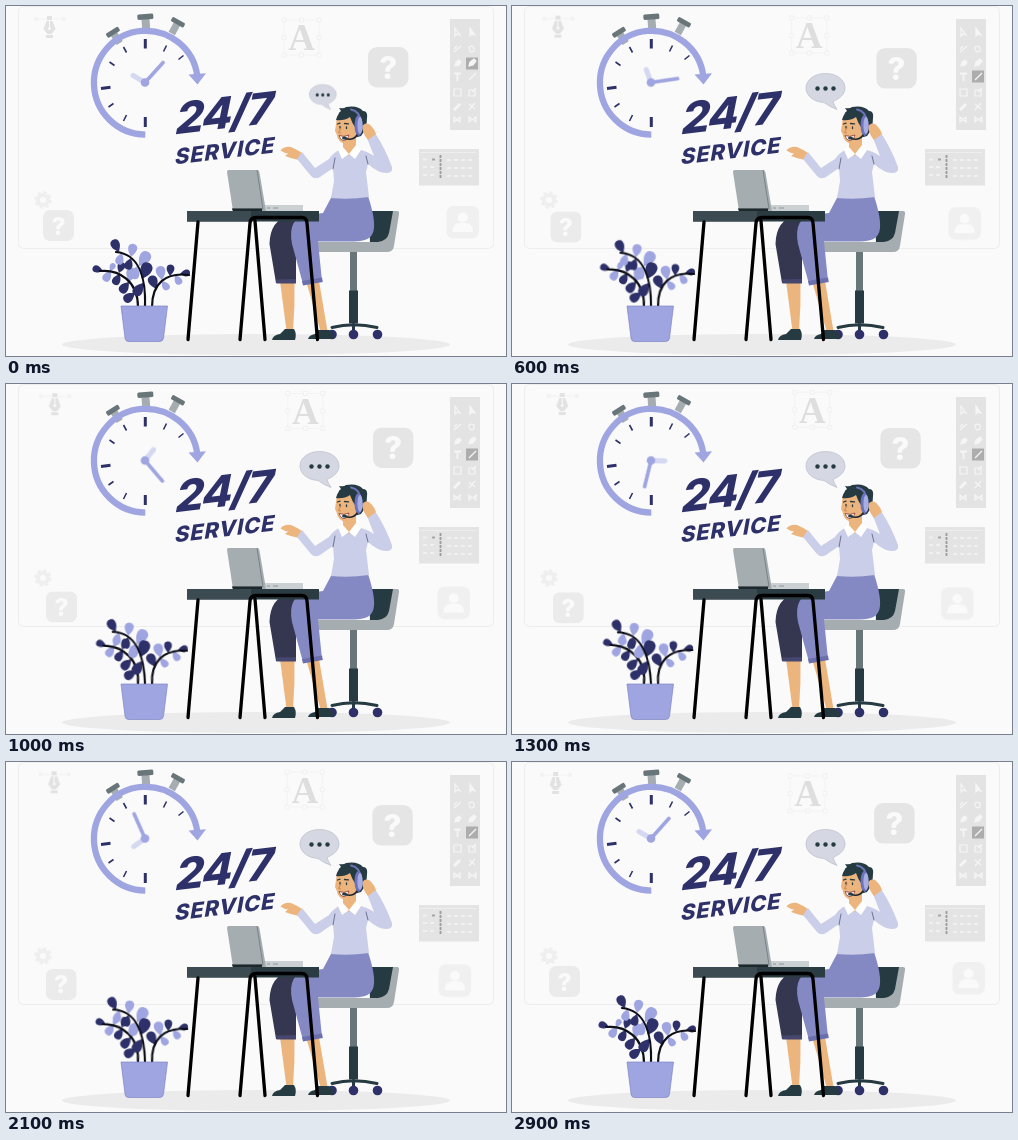
Animation, 500 px wide and 350 px high, one loop 3000 ms. Source, as an HTML page:

```html
<!DOCTYPE html>
<html lang="en">
<head>
<meta charset="utf-8">
<title>24/7 service</title>
<style>
html, body { margin: 0; height: 100%; overflow: hidden; background: #fafafa; }
svg { display: block; width: 100vw; height: 100vh; }
text { font-family: Inter, "Open Sans", sans-serif; font-weight: 800; }
.float, .sway, .hands, .bubble, .pick { animation: 3s infinite; }
.float, .sway { animation-timing-function: cubic-bezier(.37, 0, .63, 1); }
.float { animation-name: float; }
.sway { animation-name: sway; }
.hands { animation-name: turn; animation-timing-function: cubic-bezier(.37, 0, .63, 1); animation-delay: -50ms; transform-origin: 139px 76.5px; }
.bubble { animation-name: grow; animation-timing-function: ease-in-out; transform-origin: 324px 103px; }
.pick { animation-name: pick; animation-timing-function: linear; }
@keyframes float { 50% { transform: translate(var(--x), var(--y)); } }
@keyframes sway { 50% { transform: rotate(var(--a)); } }
@keyframes turn { to { transform: rotate(360deg); } }
@keyframes grow { 0% { transform: scale(.69); } 20%, 100% { transform: none; } }
@keyframes pick { 0% { transform: none; } 20%, 100% { transform: translateY(13px); } }
.ink { fill: #2e3169; }
.lilac { fill: #9fa5e0; }
.pale { fill: #cbcee8; }
.slate { fill: #263a42; }
.grey { fill: #a6adb0; }
.steel { fill: #68767a; }
.skin { fill: #ecb57d; }
.stem { fill: none; stroke: #0b0c16; stroke-width: 2.2; stroke-linecap: round; }
.line { fill: none; stroke-linecap: round; stroke-linejoin: round; }
</style>
</head>
<body>
<svg viewBox="0 0 500 350" preserveAspectRatio="none">
<defs>
  <path id="leaf" d="M0 0C-2-3-5.500-6-4.500-10.500C-3.500-14.500 3-14.500 4.200-10.500C5.200-6 2-3 0 0Z"/>
  <g id="knob"><path class="grey" d="M-4 0h8v12h-8z"/><rect class="steel" x="-8" y="-5" width="16" height="5.500" rx="1.500"/></g>
</defs>

<rect width="500" height="350" fill="#fafafa"/>
<rect x="12.500" y=".5" width="475" height="242" rx="5" fill="none" stroke="#ededed"/>

<!-- backdrop icons -->
<g class="float" style="--x:7px;--y:-1px">
  <path d="M30 13H57" stroke="#f3f3f3"/>
  <path d="M28 11h4v4h-4zM56 11h4v4h-4z" fill="#f3f3f3"/>
  <path d="M41 10h5v4h-5zM40.500 15h6l3 8-4 5h-4l-4-5zM40 29h7v3h-7z" fill="#e2e2e2"/>
  <path d="M43.500 15v7" stroke="#fafafa"/><circle cx="43.500" cy="22.500" r="1.500" fill="#fafafa"/>
</g>
<g class="float" style="--x:5px;--y:-6px">
  <path d="M278 14H313V49H278Z" fill="none" stroke="#f3f3f3"/>
  <path d="M276 12h4v4h-4zM293.500 12h4v4h-4zM311 12h4v4h-4zM276 29.500h4v4h-4zM311 29.500h4v4h-4zM276 47h4v4h-4zM293.500 47h4v4h-4zM311 47h4v4h-4z" fill="#fafafa" stroke="#efefef" stroke-width=".8"/>
  <text x="295.500" y="44.500" text-anchor="middle" fill="#dedede" style="font:700 37px 'Liberation Serif',serif">A</text>
</g>
<g class="float" style="--x:6.500px;--y:3.200px">
  <rect x="362" y="41" width="40.500" height="40.500" rx="9" fill="#e5e5e5"/>
  <text x="382.300" y="72.500" text-anchor="middle" font-size="31" fill="#fafafa">?</text>
</g>
<g class="float" style="--x:4px;--y:4.500px">
  <rect x="37" y="204" width="31" height="31" rx="7" fill="#ebebeb"/>
  <text x="52.500" y="228.500" text-anchor="middle" font-size="24.500" fill="#fafafa">?</text>
</g>
<g fill="none" stroke="#efefef">
  <circle cx="37" cy="194" r="5" stroke-width="4"/>
  <circle cx="37" cy="194" r="7.500" stroke-width="2.500" stroke-dasharray="3.300 2.590"/>
</g>
<g class="float" style="--x:-12px;--y:3.500px">
  <rect x="440.500" y="200" width="32.500" height="32.500" rx="7" fill="#f0f0f0"/>
  <circle cx="456.700" cy="211.500" r="5" fill="#fafafa"/>
  <path d="M446.500 226c0-6 3-9 7-9h6.500c4 0 7 3 7 9z" fill="#fafafa"/>
</g>

<!-- tool panel -->
<rect x="444" y="13" width="30" height="111" fill="#e3e3e3"/>
<rect class="pick" x="460" y="51.500" width="12" height="12" fill="#adadad"/>
<g fill="none" stroke="#f5f5f5" stroke-width="1.200">
  <path d="M449 22v8l2-2 3 1zM448 46l7-6M448 43l3-3M463 41q6-3 5 4q-5 3-5-4"/>
  <path d="M464 22v8l2-2 3 1zM449 60l1-4 3-2 2 2-2 3z" fill="#f5f5f5"/>
  <path d="M463 60l1-4 4-3 2 2-3 4z" fill="#f5f5f5"/>
  <path d="M448 67.500h7M451.500 67v8" stroke-width="1.800"/>
  <path d="M463 74l7-7"/>
  <path d="M448 83h7v7h-7zM463 84h6v6h-6zM466 86l4-4"/>
  <path d="M448 104l6-6" stroke-width="3"/>
  <path d="M463 104l6-7M463 98l6 5"/>
  <path d="M448 116v-5l6 5v-5zM463 111v5l3-2.500zM470 111v5l-3-2.500z"/>
</g>

<!-- small side panel -->
<rect x="413" y="143" width="60" height="36.500" fill="#e4e4e4"/>
<path d="M414 146.500H470" stroke="#eee"/>
<path d="M434.500 149v24" stroke="#9b9b9b" stroke-width="1.800" stroke-dasharray="3 1"/>
<path d="M426 153.500h3" stroke="#a5a5a5" stroke-width="2"/>
<path d="M417 153.500h6M417 161h13M417 169h13M441 154h28M441 162h28M441 170h28" stroke="#f0f0f0" stroke-width="2" stroke-dasharray="4 3"/>

<ellipse cx="250" cy="338.500" rx="194" ry="10.500" fill="#ebebeb"/>

<!-- clock -->
<use href="#knob" transform="translate(139.500 13)rotate(-4)"/>
<use href="#knob" transform="translate(108 28)rotate(-32)scale(.9)"/>
<use href="#knob" transform="translate(171 18)rotate(29)scale(.9)"/>
<path d="M139.300 128.600A51.900 51.900 0 1 1 191.300 70" fill="none" stroke="#9fa5e0" stroke-width="6.300"/>
<path class="lilac" d="M182.500 68.500L200 67.300L191.500 78.500Z"/>
<g class="line" stroke="#2e3169" style="stroke-linecap:butt">
  <path d="M139.300 33V42.500M139.300 111V121M95 82.500L104.500 81.300" stroke-width="3"/>
  <path d="M117.500 41l3 5.500M103.500 56l5 3.500M160.500 39.500l-3 6M177.500 49.500l-5 4M102.500 101l5-3.500M117.500 115l3-6" stroke-width="1.600"/>
</g>
<g class="hands line">
  <path d="M139 76.500L127 69.500" stroke="#d5d8f1" stroke-width="5"/>
  <path d="M139 76.500L157 56.500" stroke="#9fa5e0" stroke-width="3.600"/>
  <circle class="lilac" cx="139" cy="76.500" r="4.300"/>
</g>

<!-- lettering -->
<g class="ink">
  <text font-size="44.500" letter-spacing="-1.500" transform="matrix(1 -.12 -.2 1 167.500 128.500)">24/7</text>
  <text font-size="22" letter-spacing=".75" transform="matrix(1 -.12 -.18 1 168 158.500)">SERVICE</text>
</g>

<!-- speech bubble -->
<g class="bubble">
  <path d="M313.500 67.500C325 67.500 333 74 333 82C333 88 328 92.500 321 95.500Q322 99 325 103.500Q318 101 312 96.500C302 96 294 90 294 82C294 74 302 67.500 313.500 67.500Z" fill="#d5d7e2" stroke="#b9bccb" stroke-width=".7"/>
  <g class="slate"><circle cx="305.500" cy="82.500" r="2.200"/><circle cx="313.500" cy="82.500" r="2.200"/><circle cx="321.500" cy="82.500" r="2.200"/></g>
</g>

<!-- plant -->
<g class="sway" style="--a:7deg;transform-origin:131px 300px">
  <g class="lilac">
    <use href="#leaf" transform="translate(105 265)rotate(-145)scale(.9)"/>
    <use href="#leaf" transform="translate(104 265)rotate(30)scale(.65)"/>
    <use href="#leaf" transform="translate(123 276)rotate(15)scale(1.100)"/>
  </g>
  <g class="ink">
    <use href="#leaf" transform="translate(97 265)rotate(-72)scale(.8)"/>
    <use href="#leaf" transform="translate(113 267)rotate(20)scale(.85)"/>
    <use href="#leaf" transform="translate(114 268)rotate(-150)scale(.9)"/>
    <use href="#leaf" transform="translate(123 276)rotate(-140)"/>
    <use href="#leaf" transform="translate(129 287)rotate(-125)"/>
  </g>
  <path class="stem" d="M132 301C132 276 114 263 94 265"/>
</g>
<g class="sway" style="--a:-5deg;transform-origin:146px 300px">
  <g class="ink">
    <use href="#leaf" transform="translate(174 268)rotate(82)scale(.75)"/>
    <use href="#leaf" transform="translate(164 270)rotate(5)scale(.85)"/>
    <use href="#leaf" transform="translate(150 283)rotate(-20)scale(1.050)"/>
  </g>
  <g class="lilac">
    <use href="#leaf" transform="translate(169 269)rotate(150)scale(.8)"/>
    <use href="#leaf" transform="translate(156 274)rotate(-8)scale(1.050)"/>
    <use href="#leaf" transform="translate(156 275)rotate(145)scale(.8)"/>
  </g>
  <path class="stem" d="M146 301C146 277 160 266 183 269"/>
</g>
<g class="sway" style="--a:-4.600deg;transform-origin:139px 300px">
  <g class="lilac">
    <use href="#leaf" transform="translate(116 247)rotate(-160)scale(.9)"/>
    <use href="#leaf" transform="translate(125 251)rotate(12)"/>
    <use href="#leaf" transform="translate(133 260)rotate(36)scale(1.250)"/>
    <use href="#leaf" transform="translate(131 260)rotate(-165)"/>
  </g>
  <g class="ink">
    <use href="#leaf" transform="translate(113 246)rotate(-25)"/>
    <use href="#leaf" transform="translate(125 252)rotate(-160)scale(.9)"/>
    <use href="#leaf" transform="translate(136 273)rotate(24)scale(1.300)"/>
    <use href="#leaf" transform="translate(137 277)rotate(-145)scale(1.100)"/>
  </g>
  <path class="stem" d="M139 301C140 272 133 248 110 246"/>
</g>
<path d="M115 300H161.500L157.500 332Q157 335.500 153.500 335.500H122.500Q119.500 335.500 119 332Z" fill="#9fa5e0" stroke="#7f85c4" stroke-width=".7"/>

<!-- chair -->
<path class="slate" d="M363 206Q363 205 366 205H390L385 238H364Z"/>
<path class="grey" d="M387 205H391Q393.500 205 393 208L388 240Q387 246 381 246H314Q309 246 309 241V236H372Q381 235 383 227Z"/>
<path class="steel" d="M344 246h7v40h-7z"/>
<path class="slate" d="M343 284.500h9v33h-9z"/>
<path class="line" d="M326 321.500Q347.500 316 371 321.500M347.500 318v8" stroke="#263a42" stroke-width="3"/>
<g class="ink"><circle cx="326" cy="328.500" r="4.800"/><circle cx="347.500" cy="328.500" r="4.800"/><circle cx="371.500" cy="328.500" r="4.800"/></g>

<!-- legs -->
<path class="skin" d="M274 275H288.500Q289 300 287 325H280.500Z"/>
<path class="slate" d="M279 323H288Q291 328 289 334H266Q267 329 274 328Z"/>
<path d="M300 209H284Q264 214 263.500 238L270 277H290L290 240L312 232Z" fill="#35364f"/>
<path d="M270 273.500l20-.5v4.500h-19.500z" fill="#45476f"/>
<path class="skin" d="M300 275H313L321.500 325H314.500Z"/>
<path class="slate" d="M312 324H323Q328 327 328 333H302Q303 329 309 328Z"/>
<path d="M326 190H362Q370 214 367.500 225Q365 235.500 348 235.500H312L316 275L297 278L286 238Q281 211 302 209L317 207Z" fill="#8489c4"/>
<path d="M296 275l20-3.500.8 4.500-19.800 3.500z" fill="#6b70ad"/>

<!-- body -->
<path class="skin" d="M296 147Q290 143 285 141Q278 140 274.500 144.500Q278 147 282 147.500L279 150Q285 152.500 293 154Z"/>
<path class="pale" d="M333 144Q327 147 323 153L309 162L296 146L291 153L305 170Q309 174 314 171L327 162L328 175L325 192Q343 194 363 191L360 166L362 158Q372 167 380 167Q387 167 386 161Q379 142 369 127L361 132L368 150Q361 145 351 143Z"/>
<path d="M327 163L329 152M362 158L360 150" class="line" stroke="#6f7394" stroke-width="1"/>
<path class="skin" d="M337 132H350V142L343 150L337 142Z"/>
<path d="M336 140L343 148L350 139L355 144L349 153L343 148L336 153L332 144Z" fill="#fff"/>

<!-- head -->
<path class="slate" d="M333 113Q331 107 335 105L333 102Q338 103 340 101Q352 99 357 105Q362 105 361 112Q361 123 355 130L348 132L340 118Z"/>
<path class="skin" d="M331 111Q338 113 344 110Q348 117 350 121L353 123L351 130Q347 138 340 138Q332 137 330.500 128L329 125Z"/>
<path class="slate" d="M330 114Q331 106 340 105Q350 104 352 121L349.500 122Q346 117 344 111Q338 115 330 114Z"/>
<g class="line" stroke="#263a42" stroke-width="1.300">
  <path d="M331.500 118l2.500-.8M338.500 117.500l4 .4M334 120.500v1.500M340.500 121v1.500"/>
  <path d="M335 122l-2.500 4.500 2 .5" stroke="#c98555" stroke-width="1"/>
</g>
<path d="M333 129.500Q338 131.500 343 129Q341 135 337 134.500Q334 133.500 333 129.500Z" fill="#fff" stroke="#8d3a3a" stroke-width=".8"/>
<path class="skin" d="M356 121Q358 116 363 118Q368 122 370 128L362 134Q357 128 356 121Z"/>
<path class="line" d="M345 103.500Q354 105 354.500 116" stroke="#6d73b8" stroke-width="1.800"/>
<ellipse cx="352.500" cy="119.500" rx="4" ry="10.500" fill="#6d73b8"/>
<ellipse cx="354" cy="119.500" rx="2.600" ry="8.500" fill="#a8ade4"/>
<path class="line" d="M351 129Q347 135 339 132.500" stroke="#1c2430" stroke-width="1.500"/>
<ellipse class="slate" cx="338.500" cy="132" rx="2.500" ry="1.500"/>

<!-- laptop and desk -->
<path d="M259 199H297V205H259Z" fill="#cbd0d2"/>
<path d="M261 202h3M267 202h5" stroke="#8d979b"/>
<path class="grey" d="M222.500 164H251Q253 164 253.400 166L260 205H227L221 166Q221 164 222.500 164Z"/>
<path d="M251 164L257 203H226" fill="none" stroke="#77838a"/>
<path d="M226 202.500H256V205.500H227Z" fill="#1d282d"/>
<path d="M181 205H313V215.500H181Z" fill="#2b3b42"/>
<path d="M181 205H245V215.500H181Z" fill="#3b4b51"/>
<g class="line" stroke="#000" stroke-width="3.300">
  <path d="M192 216L182 333.500M234 333.500L244 217Q244.500 211.500 250 211.500H296Q300.500 211.500 301 217L311.500 333.500M249 215L259 333.500"/>
</g>
</svg>
</body>
</html>
```
